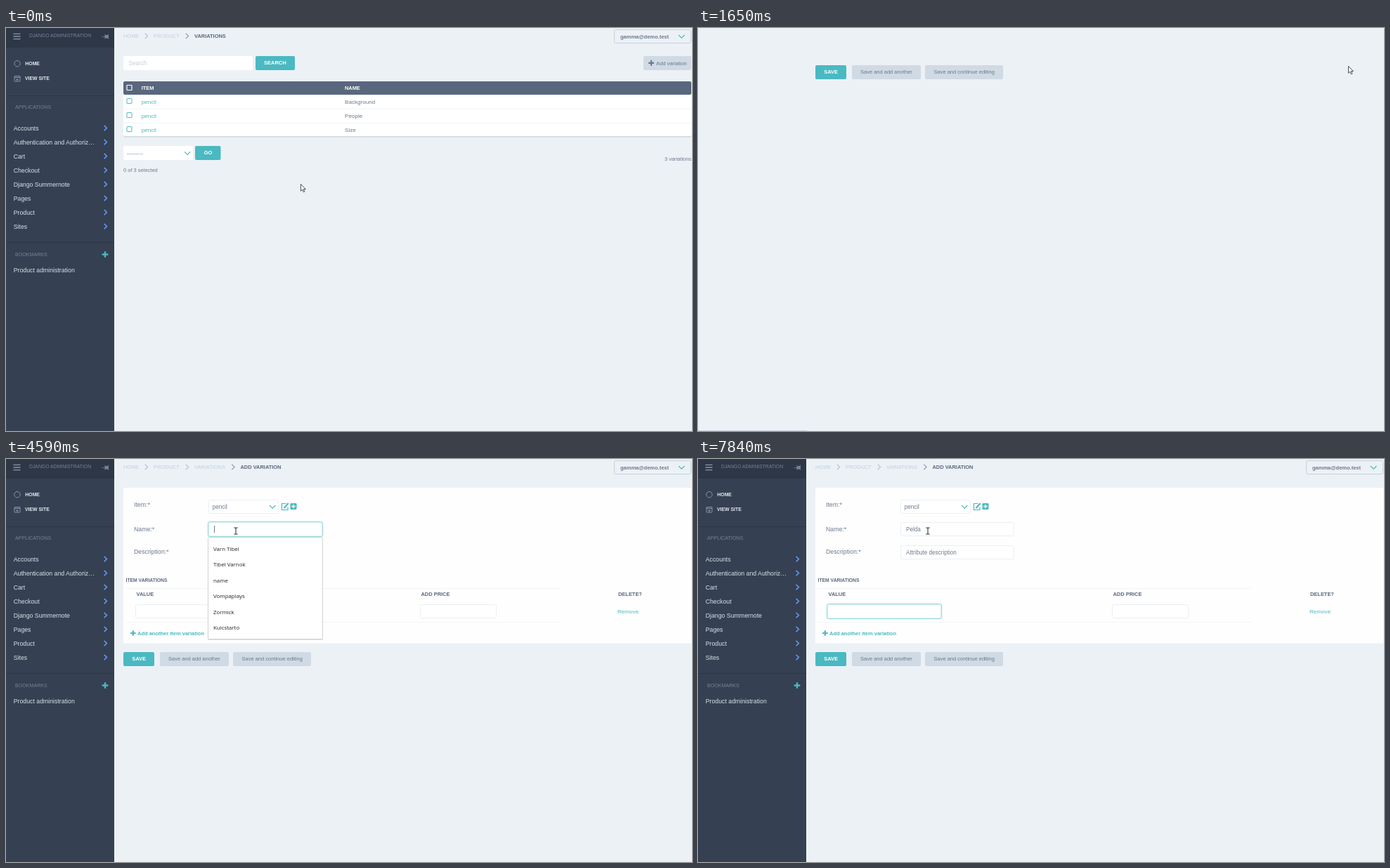
An HTML page that plays this animation: 976 px wide and 574 px high, repeating every 8 s.

```html
<!DOCTYPE html>
<html lang="en">
<head>
<meta charset="utf-8">
<title>Variations admin</title>
<style>
  html, body { margin: 0; width: 100%; height: 100%; overflow: hidden; background: #ecf1f6; }
  svg { display: block; width: 976px; height: 574px; font-family: "Liberation Sans", Arial, sans-serif; }
  .list { font-family: "Open Sans", "Noto Sans", sans-serif; }
</style>
</head>
<body>
<svg id="stage" viewBox="0 0 976 574"></svg>
<script>
const TEAL = '#4ab9c1', SLATE = '#59677e', GREY = '#6c7a8e', PALE = '#c0d0de', BLUE = '#639af5';
const LOOP = 8000;

// Drawing helpers; text is placed by the middle of its capitals.
const text = (x, mid, str, size, fill, bold) =>
  `<text x="${x}" y="${mid + size * 0.36}" font-size="${size}" fill="${fill}"${bold ? ' font-weight="700"' : ''}>${str}</text>`;
const rect = (x, y, w, h, fill, r = 0, extra = '') =>
  `<rect x="${x}" y="${y}" width="${w}" height="${h}" rx="${r}" fill="${fill}" ${extra}/>`;
const box = (x, y, w, h, stroke, fill = '#fff', r = 2, sw = 1) =>
  rect(x + 0.5, y + 0.5, w - 1, h - 1, fill, r, `stroke="${stroke}" stroke-width="${sw}"`);
const line = (d, stroke, w = 1) => `<path d="${d}" fill="none" stroke="${stroke}" stroke-width="${w}"/>`;
const right = (x, y, c, w) => line(`M${x} ${y - 3.6}l3.8 3.6l-3.8 3.6`, c, w);
const down = (x, y, c, w = 1.1) => line(`M${x} ${y - 2}l4.2 4.2l4.2 -4.2`, c, w);
const plus = (x, y, r, c, w) => line(`M${x - r} ${y}h${2 * r}M${x} ${y - r}v${2 * r}`, c, w);
const group = (id, body, cls = '') => `<g id="${id}" class="${cls}">${body}</g>`;
const button = (x, y, w, label, tx, main) =>
  rect(x, y, w, 20, main ? TEAL : '#d0dae4', 2) + text(tx, y + 9.7, label, 7.5, main ? '#fff' : GREY, main);
const ring = (x, y, w) =>
  rect(x - 0.5, y - 0.5, w + 1, 21, 'none', 3, 'stroke="#d9f1f3" stroke-width="2"') + box(x - 1, y - 1, w + 2, 22, '#9bdce1', 'none', 3);

function sidebar() {
  const apps = ['Accounts', 'Authentication and Authoriz…', 'Cart', 'Checkout', 'Django Summernote', 'Pages', 'Product', 'Sites'];
  const dim = '#74839a';
  return rect(0, 0, 154, 574, '#354052') + rect(0, 0, 154, 28, '#2d3746') +
    line('M10.5 8.3h10M10.5 12h10M10.5 15.7h10', '#8a97aa', 1.3) +
    text(33, 10.3, 'DJANGO ADMINISTRATION', 6.85, dim) +
    '<path d="M136.5 12.3h4v-3.8l1.2 1.6h2.6l1.6-1.6v7.6l-1.6-1.6h-2.6l-1.2 1.6v-3.2h-4z" fill="#74839a"/>' +
    line('M13.8 54.3A4.2 4.2 0 1 1 18.2 54.3M14.4 54.8h3.4', '#8a97aa') +
    text(27.3, 50.7, 'HOME', 6.9, '#e4eaf1', true) +
    box(11.5, 68, 9, 8.5, '#8a97aa', 'none', 0.5) + line('M12 70.5h8M16 72v3.2M14.4 73.6h3.2', '#8a97aa') +
    text(27, 72, 'VIEW SITE', 6.9, '#e4eaf1', true) +
    rect(0, 96, 154, 1, '#2c3646') + text(13, 112.6, 'APPLICATIONS', 7.1, dim) +
    apps.map((name, i) => text(10.7, 142.6 + 20 * i, name, 8.75, '#d8e0ea') + right(139.6, 142.5 + 20 * i, BLUE, 1.5)).join('') +
    rect(0, 305, 154, 1, '#2c3646') + text(13, 322, 'BOOKMARKS', 7.1, dim) +
    plus(141, 322.5, 4.3, TEAL, 2.4) + text(10.7, 344.5, 'Product administration', 8.75, '#d8e0ea');
}

function userBox() {
  return box(865, 2, 110, 20, '#c3d1dd', '#ecf1f6') +
    text(874, 12.3, 'gamma@demo.test', 7.5, GREY, true) + down(957, 12, TEAL, 1.2);
}

function crumbs(path) {
  const xs = [167, 210, 268, 333.5], last = path.length - 1;
  return path.map((s, i) => text(xs[i], 11.2, s, 7.45, i < last ? PALE : SLATE, i === last) +
    (i ? right(xs[i] - 12.2, 11.4, i < last ? '#b3c3d2' : '#8c9db0', 1.2) : '')).join('');
}

function tablePage() {
  const rows = ['Background', 'People', 'Size'];
  const addButton = (bg, fg) => rect(907, 40, 68, 20, bg, 2) + plus(918, 49.8, 4, fg, 2.2) + text(925, 49.8, 'Add variation', 7.5, fg);
  return crumbs(['HOME', 'PRODUCT', 'VARIATIONS']) +
    rect(167, 40, 184, 20, '#fff', 2) + text(174.5, 50.2, 'Search', 8.15, '#c4cfda') +
    button(355, 40, 56, 'SEARCH', 367, true) +
    addButton('#d0dae4', GREY) + group('hover', addButton('#7098da', '#fff')) +
    rect(167, 78, 808, 77.5, '#cdd8e1', 2) + rect(167, 76, 808, 78, '#fff', 2) + rect(167, 76, 808, 19, SLATE, 2) +
    box(171.5, 81, 8, 8, '#fff', 'none', 0.5, 1.2) +
    text(192.7, 85.5, 'ITEM', 7.4, '#fff', true) + text(482, 85.5, 'NAME', 7.4, '#fff', true) +
    rows.map((name, i) => {
      const y = 104.6 + 20 * i;
      return (i ? rect(167, y - 10, 808, 1, '#f0f3f6') : '') + box(171.5, y - 4.5, 8, 8, TEAL, '#fff', 0.5) +
        text(192.7, y, 'pencil', 8.1, TEAL) + text(482, y, name, 8.1, GREY);
    }).join('') +
    rect(167, 168, 99, 20, '#fff', 2) + text(172, 178.3, '---------', 7.7, GREY) + down(254, 178.2, TEAL) +
    button(269, 168, 36.5, 'GO', 281.7, true) +
    text(937, 186, '3 variations', 7.45, GREY) + text(167, 201.8, '0 of 3 selected', 7.5, GREY);
}

const saveRow = () => button(167, 275, 44, 'SAVE', 179.2, true) +
  button(219, 275, 98, 'Save and add another', 231, false) +
  button(323, 275, 111, 'Save and continue editing', 335.5, false);

function formPage() {
  const edge = '#ebeff3';
  return crumbs(['HOME', 'PRODUCT', 'VARIATIONS', 'ADD VARIATION']) + rect(167, 41, 808, 221.5, '#fefefe', 1) +
    text(182, 65.3, 'Item:*', 8.75, GREY) + text(182, 99.6, 'Name:*', 8.75, GREY) + text(182, 132.2, 'Description:*', 8.75, GREY) +
    box(288, 58, 100, 20, edge) + down(375, 68, TEAL) +
    group('blank', text(293.5, 68, '---------', 7.9, GREY)) + group('chosen', text(293.7, 68, 'pencil', 8.15, GREY)) +
    group('edit', line('M398.5 63.5h-6v9h8.5v-4', TEAL, 1.2) + line('M395.5 70l6.2-7', TEAL, 2)) +
    rect(404.5, 63, 9, 9, TEAL, 1.2) + plus(409, 67.5, 2.8, '#fff', 1.4) +
    box(288, 90, 162, 20, edge) + text(296, 100.3, '<tspan id="typed"></tspan>', 8.15, GREY) +
    box(288, 123, 162, 20, edge) + text(296, 132.8, 'Attribute description', 8.15, GREY) +
    text(170.5, 172.2, 'ITEM VARIATIONS', 6.8, SLATE, true) +
    group('rules', rect(170, 184, 618, 1, '#f1f4f7') + rect(170, 232, 618, 1, '#f1f4f7')) +
    text(185.5, 192.3, 'VALUE', 7.45, SLATE, true) + text(590.5, 192.3, 'ADD PRICE', 7.45, SLATE, true) +
    text(871, 192.3, 'DELETE?', 7.45, SLATE, true) +
    box(184, 207, 162, 20, edge) + box(589, 207, 109, 20, edge) + text(870, 216.7, 'Remove', 8.1, TEAL) +
    plus(180.8, 248, 3.8, TEAL, 2.2) + text(187, 248.2, 'Add another item variation', 7.5, TEAL, true) +
    group('openRing', ring(288, 58, 100)) + group('nameRing', ring(288, 90, 162)) +
    group('descRing', ring(288, 123, 162)) + group('valueRing', ring(184, 207, 162)) +
    group('picked', rect(296, 127.5, 72, 11, '#3390f0') + text(296, 132.8, 'Attribute description', 8.15, '#fff')) +
    rect(0, 0, 0.8, 10, '#4a5668', 0, 'id="caret"');
}

function options() {
  return box(288, 77, 100, 36, '#dfe5eb') + rect(289, 78, 98, 17, TEAL, 0, 'id="mark"') +
    text(293.5, 86.5, '---------', 7.9, GREY) + text(293.7, 103.5, 'pencil', 8.15, GREY);
}

const hints = {
  '': ['Varn Tibel', 'Tibel Varnok', 'name', 'Vompaplays', 'Zormick', 'Kulcstarto'],
  P: ['Pelda', 'Papir', 'Pencil set', 'Pecsetviasz keszletek', 'Piros', 'Posta'],
  Pe: ['Pelda', 'Pelda ketto', 'Pencil set', 'Pecsetviasz keszletek', 'Pencil', 'Peldany']
};
const hintList = () => rect(287, 113, 164, 145, '#000', 1, 'opacity=".12"') + box(287, 111, 164, 146, '#cfd3d6', '#fff', 1) +
  hints[''].map((s, i) => text(295, 128 + 22.5 * i, s, 7.9, '#222').replace('<text', '<text class="hint"')).join('');

const pointers =
  group('arrow', '<path d="M.4 .4V10.2L2.7 8.1L4.3 11.7L5.9 11L4.3 7.5H7.3Z" fill="#fff" stroke="#222" stroke-width=".8"/>') +
  group('hand', '<path d="M-.9 .9Q0-.5 .9 .9V5Q2 4.2 2.8 5.2Q3.9 4.6 4.6 5.6Q6 5.2 6.3 6.6V9.4L5.2 13H-.6L-3.2 8.8Q-3.8 7.2-2.4 7.2L-.9 8.6Z" fill="#fff" stroke="#222" stroke-width=".9"/>') +
  group('beam', line('M-2.7-4.5H-.6L0-4L.6-4.5H2.7M0-4V4M-2.7 4.5H-.6L0 4L.6 4.5H2.7', '#333', 1.1));

document.getElementById('stage').innerHTML = rect(0, 0, 976, 574, '#ecf1f6') +
  group('frame', sidebar() + userBox()) + group('table', tablePage()) + group('form', formPage()) +
  group('save', saveRow()) + group('options', options()) + group('hints', hintList(), 'list') +
  rect(0, 573, 155, 1, '#ccd5dc', 0, 'id="status"') + pointers;

const $ = Object.fromEntries([...document.querySelectorAll('[id]')].map(el => [el.id, el]));
const hintRows = document.querySelectorAll('.hint');

// Start time, pointer shape, x, y.
const path = [
  [0, 'arrow', 419, 222], [150, 'arrow', 462, 194], [270, 'arrow', 574, 140], [390, 'arrow', 716, 94],
  [510, 'arrow', 852, 63], [630, 'arrow', 938, 48], [750, 'arrow', 968, 46],
  [900, 'hand', 957, 49], [1020, 'hand', 949, 51], [1140, 'hand', 943.5, 52],
  [1650, 'arrow', 925, 54], [1800, 'arrow', 781, 69], [1920, 'arrow', 618, 81], [2040, 'arrow', 490, 88],
  [2160, 'arrow', 402, 91], [2280, 'arrow', 359, 88], [2430, 'hand', 347, 74],
  [2850, 'hand', 344, 93], [2970, 'hand', 341, 105],
  [3120, 'beam', 338, 107], [3240, 'beam', 332, 104], [3360, 'beam', 328, 103], [3480, 'beam', 327, 102.5]
];
const hover = [[0, 0], [900, 0.25], [1020, 0.55], [1140, 0.8], [1260, 0.95], [1410, 1]];
const typing = [[0, ''], [5120, 'P'], [5400, 'Pe'], [5680, 'Pel'], [5990, 'Pelda']];
// Start time, visible, x, y.
const caret = [
  [0, 0], [3630, 1, 296, 95], [4060, 0], [4590, 1, 296, 95], [5120, 1, 301.6, 95], [5400, 1, 306, 95],
  [5680, 1, 308, 95], [5990, 1, 317, 95], [6550, 0], [7410, 1, 192, 212], [7840, 0]
];
const nameRing = [[0, 0], [3630, 1], [6860, 0.4], [6980, 0]];
const descRing = [[0, 0], [6860, 0.6], [6980, 1], [7410, 0]];
const openRing = [[0, 0], [2580, 0.6], [2700, 1], [3120, 0.7], [3240, 0.4], [3360, 0.15], [3480, 0]];

const at = (table, t) => table.findLast(row => row[0] <= t);
const show = (el, on) => { el.style.opacity = +on; };
const move = (el, x, y) => el.setAttribute('transform', `translate(${x} ${y})`);

function draw(t) {
  const loading = t >= 1650 && t < 1800;
  show($.frame, !loading);
  show($.table, t < 1650);
  show($.form, t >= 1800);
  show($.save, t >= 1650);
  move($.save, 0, loading ? -222 : 0);
  show($.status, t >= 1410 && t < 1920);
  show($.rules, t >= 1920);
  show($.hover, at(hover, t)[1]);

  show($.options, t >= 2700 && t < 3120);
  $.mark.setAttribute('y', t < 2970 ? 78 : 95);
  show($.blank, t < 3120);
  show($.chosen, t >= 3120);
  show($.edit, t < 3120 ? 0.65 : 1);

  show($.openRing, at(openRing, t)[1]);
  show($.nameRing, at(nameRing, t)[1]);
  show($.descRing, at(descRing, t)[1]);
  show($.valueRing, t >= 7410);
  show($.picked, t >= 6860 && t < 7410);

  const word = at(typing, t)[1];
  $.typed.textContent = word;
  show($.hints, t >= 3630 && t < 5680);
  if (hints[word]) hintRows.forEach((row, i) => { row.textContent = hints[word][i]; });
  const [, lit, cx = 0, cy = 0] = at(caret, t);
  show($.caret, lit);
  move($.caret, cx, cy);

  const [, shape, x, y] = at(path, t);
  for (const id of ['arrow', 'hand', 'beam']) show($[id], id === shape);
  move($[shape], x, y);
}

const start = performance.now();
function tick() {
  draw((performance.now() - start) % LOOP);
  requestAnimationFrame(tick);
}
tick();
</script>
</body>
</html>
```
